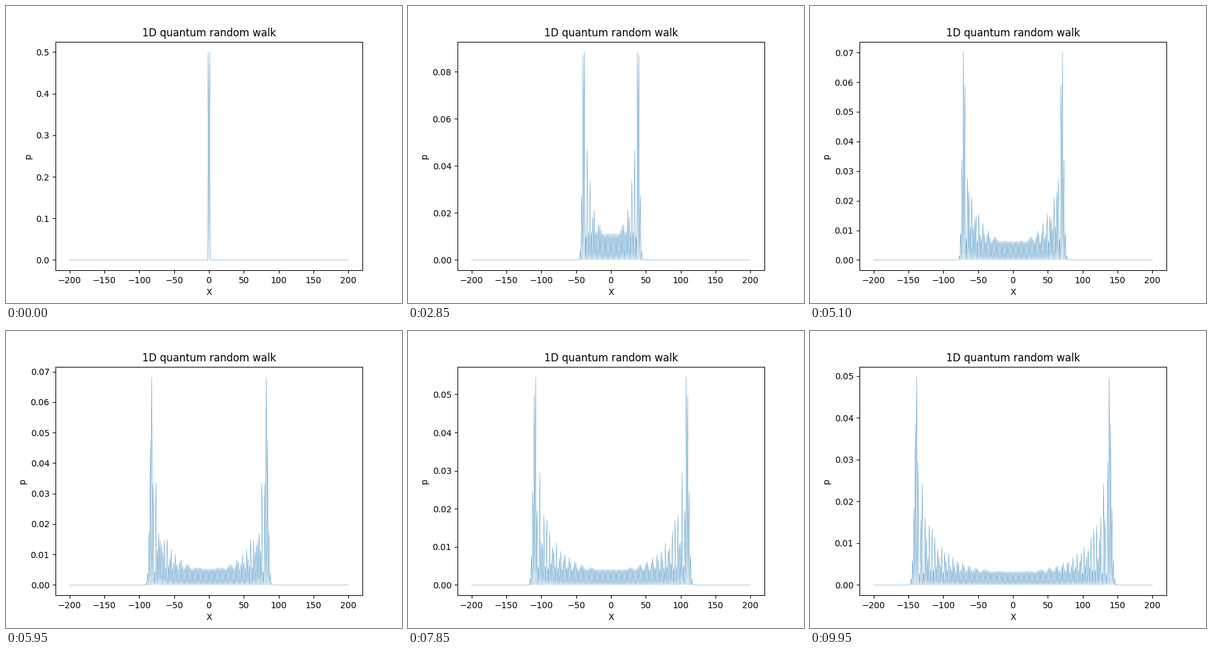
Animation of 640x480 px, one loop 10 s. Source, as a matplotlib script:

```python
import numpy as np
import matplotlib.pyplot as plt
from matplotlib.animation import FuncAnimation

STEPS = 200
INTERVAL = 50
x = np.arange(-STEPS, STEPS + 1)


def quantum_walk(steps):
    """Position probabilities after each step of a symmetric Hadamard walk."""
    left = np.zeros(x.size, complex)
    right = np.zeros(x.size, complex)
    left[steps] = 1 / np.sqrt(2)
    right[steps] = 1j / np.sqrt(2)
    history = []
    for _ in range(steps):
        left, right = (left + right) / np.sqrt(2), (left - right) / np.sqrt(2)
        left, right = np.roll(left, -1), np.roll(right, 1)
        history.append(np.abs(left) ** 2 + np.abs(right) ** 2)
    return history


probabilities = quantum_walk(STEPS)

fig, ax = plt.subplots(figsize=(6.4, 4.8), dpi=100)
line, = ax.plot(x, probabilities[0], color="#1f77b4", linewidth=0.3)
ax.set_title("1D quantum random walk")
ax.set_xlabel("X")
ax.set_ylabel("p")


def update(frame):
    line.set_ydata(probabilities[frame])
    ax.relim()
    ax.autoscale_view()
    return line,


anim = FuncAnimation(fig, update, frames=STEPS, interval=INTERVAL,
                     repeat=True, repeat_delay=0, blit=False)
plt.show()
```
